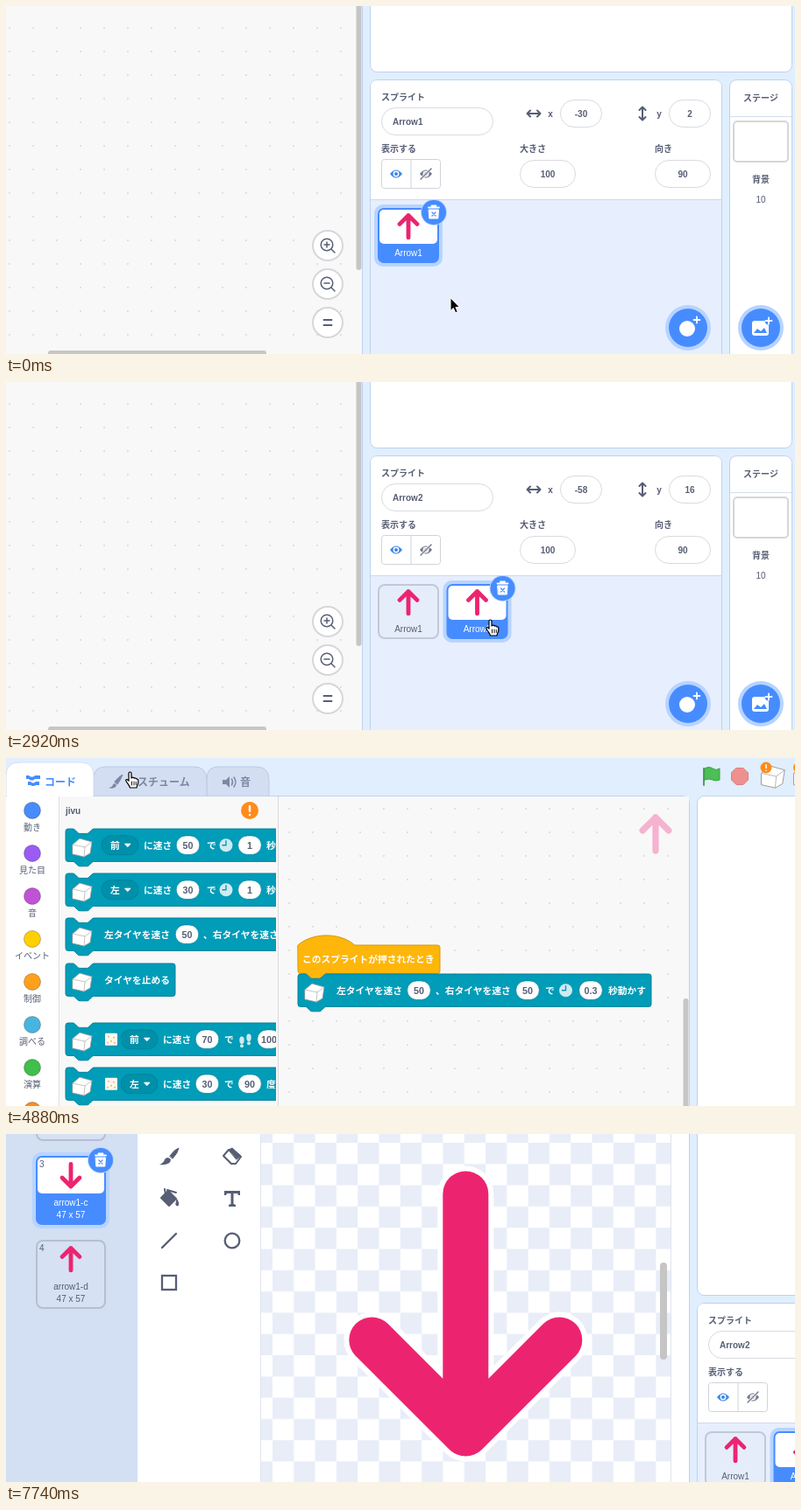
An HTML page for the animation above (7.8 s loop, 900 px wide and 398 px high).

```html
<!DOCTYPE html>
<html lang="ja">
<head>
<meta charset="utf-8">
<title>Duplicating a sprite</title>
<style>
  html, body { margin: 0; width: 100%; height: 100%; overflow: hidden; background: #e0eefe; }
  svg { display: block; width: 900px; height: 398px; }
  text { font: bold 10px "Liberation Sans", "Noto Sans CJK JP", "Noto Sans CJK", sans-serif; fill: #575e75; }
  .mid { text-anchor: middle; }
  .reg { font-weight: 400; }
  .white { fill: #fff; }
  .block { font-size: 10.75px; }
  .tab { font-size: 12px; }
  .menu { font-size: 13.3px; font-weight: 500; }
</style>
</head>
<body>
<svg viewBox="0 0 900 398">
  <defs>
    <pattern id="dots" x="25" y="3" width="27" height="27" patternUnits="userSpaceOnUse">
      <rect width="2" height="2" fill="#e0e0e0"/>
    </pattern>
    <pattern id="checks" x="304" y="231" width="48.6" height="48.6" patternUnits="userSpaceOnUse">
      <path d="M0 0h24.3v24.3H0zM24.3 24.3h24.3v24.3H24.3z" fill="#e8edf8"/>
    </pattern>
    <clipPath id="flyout"><rect x="61" y="44" width="247" height="800"/></clipPath>
    <filter id="shadow" x="-20%" y="-20%" width="140%" height="140%">
      <feDropShadow dx="0" dy="0" stdDeviation="2.5" flood-opacity=".25"/>
    </filter>
  </defs>
  <g id="world"></g>
  <g id="cursor"></g>
</svg>
<script>
const LOOP = 7800;
const BLUE = '#478cff', HALO = '#b7d4ff', INK = '#575e75', PINK = '#ec2470', LINE = '#bdd3ec';
const TEAL = '#009cb8', ORANGE = '#ff8c1a';

// ---- drawing helpers ----
const text = (x, y, s, cls = '', fill = '') =>
  `<text x="${x}" y="${y}" class="${cls}"${fill ? ` style="fill:${fill}"` : ''}>${s}</text>`;
const rect = (x, y, w, h, r, fill, stroke = 'none', sw = 1) =>
  `<rect x="${x}" y="${y}" width="${w}" height="${h}" rx="${r}" fill="${fill}" stroke="${stroke}" stroke-width="${sw}"/>`;
const disc = (x, y, r, fill, stroke = 'none', sw = 1) =>
  `<circle cx="${x}" cy="${y}" r="${r}" fill="${fill}" stroke="${stroke}" stroke-width="${sw}"/>`;
const path = (d, fill, stroke = 'none', sw = 1) =>
  `<path d="${d}" fill="${fill}" stroke="${stroke}" stroke-width="${sw}" stroke-linecap="round" stroke-linejoin="round"/>`;
const at = (x, y, s, extra = '') => `<g transform="translate(${x} ${y}) ${extra}">${s}</g>`;

const arrow = (x, y, scale, turn, color = PINK, rim = 0) => {
  const d = 'M0 137V-137M-107 -30L0 -137 107 -30';
  return at(x, y, (rim ? path(d, 'none', '#fff', 52 + rim * 2) : '') + path(d, 'none', color, 52),
    `rotate(${turn}) scale(${scale})`);
};

const badge = (x, y) => at(x, y,
  disc(0, 0, 15, HALO) + disc(0, 0, 14, BLUE) +
  path('M-6 -5.5H6M-2.5 -7.5H2.5', 'none', '#fff', 1.8) +
  path('M-5.5 -3H5.5L4.8 7H-4.8Z', '#fff', '#fff') +
  path('M-2 0L2 4M2 0L-2 4', 'none', BLUE, 1.3));

const tile = (x, y, w, h, top, on, turn, lines, num = '') => {
  const cx = x + w / 2;
  return (on
    ? rect(x - 4, y - 4, w + 8, h + 8, 10, HALO) + rect(x, y, w, h, 7, BLUE) + rect(x + 2, y + 2, w - 4, top - 2, 5, '#fff')
    : rect(x + 1, y + 1, w - 2, h - 2, 7, num ? '#d6e1f4' : '#e6edfa', num ? '#b6bfd1' : '#c1c8d8', 2)) +
    arrow(cx, y + top / 2 + .7, .093, turn) +
    lines.map((s, i) => text(cx, y + top + 14 + i * 14, s, 'mid reg' + (on ? ' white' : ''))).join('') +
    (num ? text(x + 4, y + 13, num, 'reg') : '') +
    (on ? badge(x + w - 6, y + 5) : '');
};

const field = (x, y, w, s, left) => rect(x + .5, y + .5, w - 1, 31, 15.5, '#fff', '#d9dbe1') +
  (left ? text(x + 13, y + 20, s) : text(x + w / 2, y + 20, s, 'mid'));

const eye = (x, y, color, shut) => at(x, y,
  path('M-7 0Q0 -9 7 0Q0 9 -7 0Z', color) + disc(0, 0, 3.4, '#fff') + disc(0, 0, 2, color) +
  (shut ? path('M-6 6L6 -6', 'none', '#fff', 3) + path('M-6 6L6 -6', 'none', color, 1.4) : ''));

const cube = (x, y) => at(x, y,
  path('M-11 -3L-3 -10 11 -6 9 7 2 11 -11 8Z', '#fff', '#9a9a9a', .8) +
  path('M-11 -3L3 0 11 -6M3 0L2 11', 'none', '#b5b5b5', .8));

const alert = (x, y, r) => disc(x, y, r, ORANGE) +
  path(`M${x} ${y - r * .5}V${y + r * .08}M${x} ${y + r * .5}v.1`, 'none', '#fff', r * .24);

// ---- script blocks ----
const NOTCH = 'c2 0 3 1 4 2l4 4c1 1 2 2 4 2h12c2 0 3 -1 4 -2l4 -4c1 -1 2 -2 4 -2';
const BUMP = 'c-2 0 -3 1 -4 2l-4 4c-1 1 -2 2 -4 2h-12c-2 0 -3 -1 -4 -2l-4 -4c-1 -1 -2 -2 -4 -2';
const shape = (x, y, w, h, fill, stroke, hat) => {
  const k = .675, W = w / k, H = h / k;
  const start = hat ? 'M0 0c25 -22 71 -22 96 0' : `M0 4A4 4 0 0 1 4 0H12${NOTCH}`;
  return at(x, y, path(`${start}H${W - 4}a4 4 0 0 1 4 4V${H - 4}a4 4 0 0 1 -4 4H48${BUMP}H4a4 4 0 0 1 -4 -4Z`,
    fill, stroke, 1.4), `scale(${k})`);
};
const parts = {
  say: (x, y, s) => text(x, y + 4, s, 'block white'),
  num: (x, y, s) => rect(x - 13.3, y - 10.8, 26.6, 21.6, 10.8, '#fff', '#007f96', .7) + text(x, y + 4, s, 'block mid'),
  drop: (x, y, s) => rect(x - 10, y - 11, 42, 22, 11, '#0090aa', '#007f96', .8) + text(x, y + 4, s, 'block white') +
    path(`M${x + 17} ${y - 1.5}h6l-3 3.2Z`, '#fff', '#fff'),
  clock: (x, y) => disc(x, y, 7.5, '#cfeaf0') + path(`M${x} ${y - 5}V${y}H${x - 4}`, 'none', TEAL, 1.4),
  mat: (x, y) => rect(x - 7, y - 7, 14, 14, 1, '#fff8ec') +
    [[-3, -3], [3, -2], [0, 2], [4, 4], [-4, 4]].map(([a, b]) => disc(x + a, y + b, 1, '#e9b48a')).join(''),
  feet: (x, y) => [[-4, 1], [4, -2]].map(([a, b]) =>
    `<ellipse cx="${x + a}" cy="${y + b}" rx="2.7" ry="4.2" fill="#cfeaf0"/>` + disc(x + a, y + b + 6.5, 2, '#cfeaf0')).join('')
};
const block = (x, y, w, items) => shape(x, y, w, 37.4, TEAL, '#007f96') + cube(x + 19, y + 21) +
  items.map(([kind, dx, s]) => parts[kind](x + dx, y + 18.7, s)).join('');

const go = (dir, speed) => [['drop', 51, dir], ['say', 89, 'に速さ'], ['num', 139.5, speed], ['say', 161, 'で'],
  ['clock', 183], ['num', 210, '1'], ['say', 229, '秒']];
const goMat = (dir, speed) => [['mat', 52], ['drop', 73, dir], ['say', 111, 'に速さ'], ['num', 161.5, speed], ['say', 181, 'で']];

const CATS = [['動き', BLUE], ['見た目', '#9a5cf5'], ['音', '#c052d8'], ['イベント', '#ffd000'],
  ['制御', '#ffa01c'], ['調べる', '#47b5e0'], ['演算', '#40bf4a'], ['変数', ORANGE]];

function codeView() {
  const rows = [
    [81, 260, go('前', '50')],
    [132, 260, go('左', '30')],
    [183, 300, [['say', 44, '左タイヤを速さ'], ['num', 138.5, '50'], ['say', 157, '、右タイヤを速さ']]],
    [235, 125, [['say', 44, 'タイヤを止める']]],
    [303, 300, [...goMat('前', '70'), ['feet', 205], ['num', 232, '100']]],
    [354, 300, [...goMat('左', '30'), ['num', 210, '90'], ['say', 229, '度']]]
  ];
  const zoom = [604, 648, 692].map((y, i) => disc(740, y, 17, '#fff', '#d6d7da', 2) +
    (i < 2
      ? disc(739, y - 1, 6.8, 'none', INK, 1.5) + path(`M744 ${y + 4}l4 4M736 ${y - 1}h6${i ? '' : `M739 ${y - 4}v6`}`, 'none', INK, 1.5)
      : path(`M735.5 ${y - 3}h9M735.5 ${y + 3}h9`, 'none', INK, 1.9))).join('');
  return rect(310, 44, 469, 760, 0, '#f8f8f8') + rect(310, 44, 469, 760, 0, 'url(#dots)') +
    rect(61, 44, 249, 760, 0, '#f8f8f8') + rect(60, 44, 1, 760, 0, '#dcdfe6') + rect(310, 44, 1, 760, 0, '#d8dade') +
    CATS.map(([s, c], i) => disc(30, 60 + i * 49, 9.5, c, 'rgba(0,0,0,.25)') + text(30, 83 + i * 49, s, 'mid reg')).join('') +
    text(68, 64, 'jivu', '" font-size="12.5') + alert(278, 60, 10) +
    `<g clip-path="url(#flyout)">${rows.map(([y, w, items]) => block(68, y, w, items)).join('')}</g>` +
    arrow(741, 87, .139, 0, '#f5b3d0') +
    shape(333, 214, 162, 32.4, '#ffb60a', '#d09a10', true) + text(338, 234, 'このスプライトが押されたとき', 'block white') +
    block(333, 247, 403, [['say', 44, '左タイヤを速さ'], ['num', 138, '50'], ['say', 157, '、右タイヤを速さ'],
      ['num', 262, '50'], ['say', 282, 'で'], ['clock', 305.5], ['num', 334, '0.3'], ['say', 354, '秒動かす']]) +
    zoom + rect(772.5, 275, 6, 357, 3, '#c6c6c6') + rect(421, 724, 249, 6, 3, '#c6c6c6');
}

function costumeView(picked) {
  const list = [['a', 90], ['b', 270], ['c', 180], ['d', 0]];
  const turn = list[picked][1];
  const tools =
    path('M187 246Q192 239 197 237Q196 243 190 249Z', INK, INK) + path('M175 256Q180 254 181 250Q184 246 188 250Q188 257 175 256Z', INK) +
    path('M248 246l6 -7 14 8 -6 8h-5Z', 'none', INK, 2) + path('M254 239l4 -2 10 9 -5 4Z', INK, INK) +
    path('M177 294l8 -8 9 9 -8 8Z', INK, INK, 2) + path('M182 290l-1 -6M184 285l10 3', 'none', INK, 2) +
    path('M195 296q3 5 1 7q-3 0 -2 -3Z', INK, INK) +
    path('M249 286h18v5h-2l-1 -2h-4.5v12l2.5 1v2h-8v-2l2.5 -1v-12H252l-1 2h-2Z', INK) +
    path('M178 351L194 335', 'none', INK, 2.4) + disc(258, 343, 8.3, 'none', INK, 2.3) +
    rect(178, 383, 16, 16, 0, 'none', INK, 2.3);
  return rect(0, 44, 150, 760, 0, '#d3dff2') +
    list.map(([s, r], i) => tile(34, 54 + i * 96, 80, 79, 43, i === picked, r,
      ['arrow1-' + s, i < 2 ? '57 x 47' : '47 x 57'], String(i + 1))).join('') +
    tools + rect(291, 200, 467, 600, 0, '#fff') + rect(291, 200, 467, 600, 0, 'url(#checks)') +
    rect(290, 200, 1, 600, 0, '#dfe5ef') + rect(758, 200, 1, 600, 0, '#dfe5ef') +
    arrow(524.3, 426.5, 1, turn, PINK, 6) + rect(746, 368, 8, 111, 4, '#c5c5c5');
}

function tabs(costume) {
  const tab = (x, w, s, on, tx) => path(`M${x} 44V${on ? 20 : 24}q0 -15 15 -15h${w - 30}q15 0 15 15V44`.replace(/-15h/, on ? '-15h' : '-14h'),
    on ? '#fff' : '#d3def2', on ? '#d3e0f3' : '#bccbe2') + text(tx, 32, s, 'tab', on ? BLUE : '#7c88a3');
  const c1 = costume ? '#7c88a3' : BLUE, c2 = costume ? BLUE : '#7c88a3';
  return tab(229, 71, '音', false, 267) + tab(100, 129, 'コスチューム', costume, 138) + tab(0, 100, 'コード', !costume, 44) +
    path('M23 20h3l2 1.5h3l2 -1.5h6v4H33l-2 1.5h-3L26 24h-3ZM25 27h3l2 1.5h2l2 -1.5h4v4H34l-2 1H30l-2 -1h-3Z', c1) +
    path('M124 27Q129 21 133 19Q131 25 127 30Z', c2, c2) + path('M117 34q5 -1 5 -4q3 -2 4 2q-3 4 -9 2Z', c2) +
    path('M247 25h4l4 -4v13l-4 -4h-4Z', '#7c88a3') + path('M257.5 24q2 3.500 0 7M260 22q4 5.500 0 11', 'none', '#7c88a3', 1.5);
}

// Stage and sprite pane
function rightPane(s) {
  const x = s.dup ? '-58' : '-30', y = s.dup ? '16' : '2';
  const spark = 'M-3.500 0H3.500M0 -3.500V3.500';
  const round = (cx, icon) => disc(cx, 368, 26, HALO) + disc(cx, 368, 22, BLUE) + icon;
  const pane =
    rect(415.5, -286.5, 481, 362, 8, '#fff', LINE) +
    rect(415.5, 84.5, 401, 420, 8, '#e7eefd', LINE) +
    path('M416 221.500V92.500q0 -7.500 7.500 -7.500H808.500q7.500 0 7.500 7.500V221.500Z', '#fff') + rect(416, 221, 400, 1, 0, '#cfdaeb') +
    text(428, 108, 'スプライト') + field(428, 116, 128, s.dup ? 'Arrow2' : 'Arrow1', true) +
    path('M596 123H608M598 119.500l-3.500 3.500 3.500 3.500M606 119.500l3.500 3.500 -3.500 3.500', 'none', INK, 2) +
    path('M726 117V129M722.500 119l3.500 -3.500 3.500 3.500M722.500 127l3.500 3.500 3.500 -3.500', 'none', INK, 2) +
    text(621, 127, 'x', 'mid') + field(632, 107, 48, x) + text(745, 127, 'y', 'mid') + field(756, 107, 48, y) +
    text(428, 167, '表示する') + rect(428.5, 175.5, 67, 33, 3, '#fff', '#d0d3da') + rect(461.5, 176, 1, 32, 0, '#d0d3da') +
    eye(445, 192, '#3f86e8') + eye(479, 192, '#747a8c', true) +
    text(586, 167, '大きさ') + field(586, 176, 64, '100') + text(740, 167, '向き') + field(740, 176, 64, '90') +
    tile(424, 231, 70, 63, 41, !s.dup, 0, ['Arrow1']) +
    (s.dup ? tile(502.5, 231, 70, 63, 41, true, s.down ? 180 : 0, ['Arrow2']) : '') +
    round(778, disc(777, 369, 9, '#fff') + at(788, 359, path(spark, 'none', '#fff', 1.8))) +
    rect(825.5, 84.5, 71, 420, 8, '#fff', LINE) + rect(826, 126, 70, 1, 0, '#d3ddec') +
    text(861, 109, 'ステージ', 'mid') + rect(830, 132, 62, 46, 4, '#fff', '#d5d6da', 2) +
    text(861, 202, '背景', 'mid') + text(861, 225, '10', 'mid reg') +
    round(861, rect(851, 360, 19, 17, 3, '#fff') + path('M853 374l4 -5 4 3 4 -4 3 6Z', BLUE) +
      disc(870, 360, 4.500, BLUE) + at(870, 360, path(spark, 'none', '#fff', 1.8)));
  const menu = `<g filter="url(#shadow)">${rect(465.5, 270.5, 128.500, 123, 3, '#fff', '#c9cbd0')}</g>` +
    (s.hover ? rect(466, 276, 128, 37, 0, BLUE) : '') + rect(466, 350, 128, 1, 0, '#d8d8d8') +
    text(478, 298, '複製', 'menu' + (s.hover ? ' white' : '')) + text(478, 335, '書き出し', 'menu') + text(478, 373, '削除', 'menu');
  return at(373, 330, pane + (s.menu ? menu : ''));
}

const header =
  path('M796 12v19', 'none', '#3f9a48', 1.8) + path('M797 12q5 -3 9 0t8 0v13q-4 2 -8 0t-9 0Z', '#4cbf56', '#3f9a48') +
  path('M833 11.500h8l5.500 5.500v8l-5.500 5.500h-8l-5.500 -5.500v-8Z', '#ee9090', '#dd8080') +
  at(875, 21, cube(0, 0), 'scale(1.2)') + alert(867, 11, 6.5) + at(912, 21, cube(0, 0), 'scale(1.2)') + alert(904, 11, 6);

const scene = s => rect(-10, -10, 1300, 800, 0, '#e0eefe') + header + tabs(s.costume) +
  path('M-5 43.500H771q8.500 0 8.500 8.500V810H-5Z', '#fff', LINE) +
  rect(s.costume ? 101 : 1, 42, s.costume ? 127 : 98, 3, 0, '#fff') +
  (s.costume ? costumeView(s.down ? 2 : 3) : codeView()) + rightPane(s);

// ---- motion: [time, x, y] in page coordinates ----
const CAMERA = [[0, 373, 330], [3300, 373, 330], [3720, 0, 0], [5100, 0, 0], [5500, 0, 221]];
const POINTER = [[0, 880, 664], [450, 880, 664], [950, 838, 600], [1200, 838, 600], [1560, 858, 623], [1900, 858, 623],
  [2500, 926, 602], [3250, 926, 602], [3740, 285, 62], [3860, 285, 62], [4400, 142, 16], [5080, 142, 16],
  [5800, 83, 270], [6600, 83, 270], [7050, 105, 190]];
const HAND = [[820, 3320], [4000, 5120], [5620, 6800]];

const ARROW_CURSOR = path('M0 0V14.500L3.300 11.500 5.700 16.800 8.200 15.700 5.900 10.500H10.300Z', '#000', '#fff', 1);
const HAND_CURSOR = path('M-2 1.500C-2 -.5 1 -.5 1 1.500V7l1 -.6c1 -.5 2 0 2.200 .8 1 -.6 2.200 -.2 2.400 .8 1.200 -.4 2.200 .3 2.200 1.500V12c0 2 -1.500 3 -1.800 6H-.5C-.8 16 -3.500 13 -5 10.500 -6 9 -4.500 8 -3.200 9L-2 10.200Z',
  '#fff', '#000', 1.200) + path('M1.500 11v4M4 11v4M6.300 11.500v3', 'none', '#000', .9);

function sample(keys, t) {
  const i = keys.findIndex(k => k[0] > t);
  if (i < 0) return keys[keys.length - 1].slice(1);
  const a = keys[i - 1], b = keys[i], p = (t - a[0]) / (b[0] - a[0]), e = p * p * (3 - 2 * p);
  return [a[1] + (b[1] - a[1]) * e, a[2] + (b[2] - a[2]) * e];
}

const world = document.getElementById('world'), cursor = document.getElementById('cursor');
let lastState = '', lastHand = null;

function draw() {
  const t = performance.now() % LOOP;
  const state = { menu: t >= 1180 && t < 1850, hover: t >= 1320, dup: t >= 1850, costume: t >= 5080, down: t >= 6000 };
  const key = JSON.stringify(state);
  if (key !== lastState) world.innerHTML = scene(state);
  lastState = key;
  const hand = HAND.some(([a, b]) => t >= a && t < b);
  if (hand !== lastHand) cursor.innerHTML = hand ? HAND_CURSOR : ARROW_CURSOR;
  lastHand = hand;
  const [cx, cy] = sample(CAMERA, t), [px, py] = sample(POINTER, t);
  world.setAttribute('transform', `translate(${-cx} ${-cy})`);
  cursor.setAttribute('transform', `translate(${px - cx} ${py - cy})`);
  requestAnimationFrame(draw);
}
draw();
</script>
</body>
</html>
```
